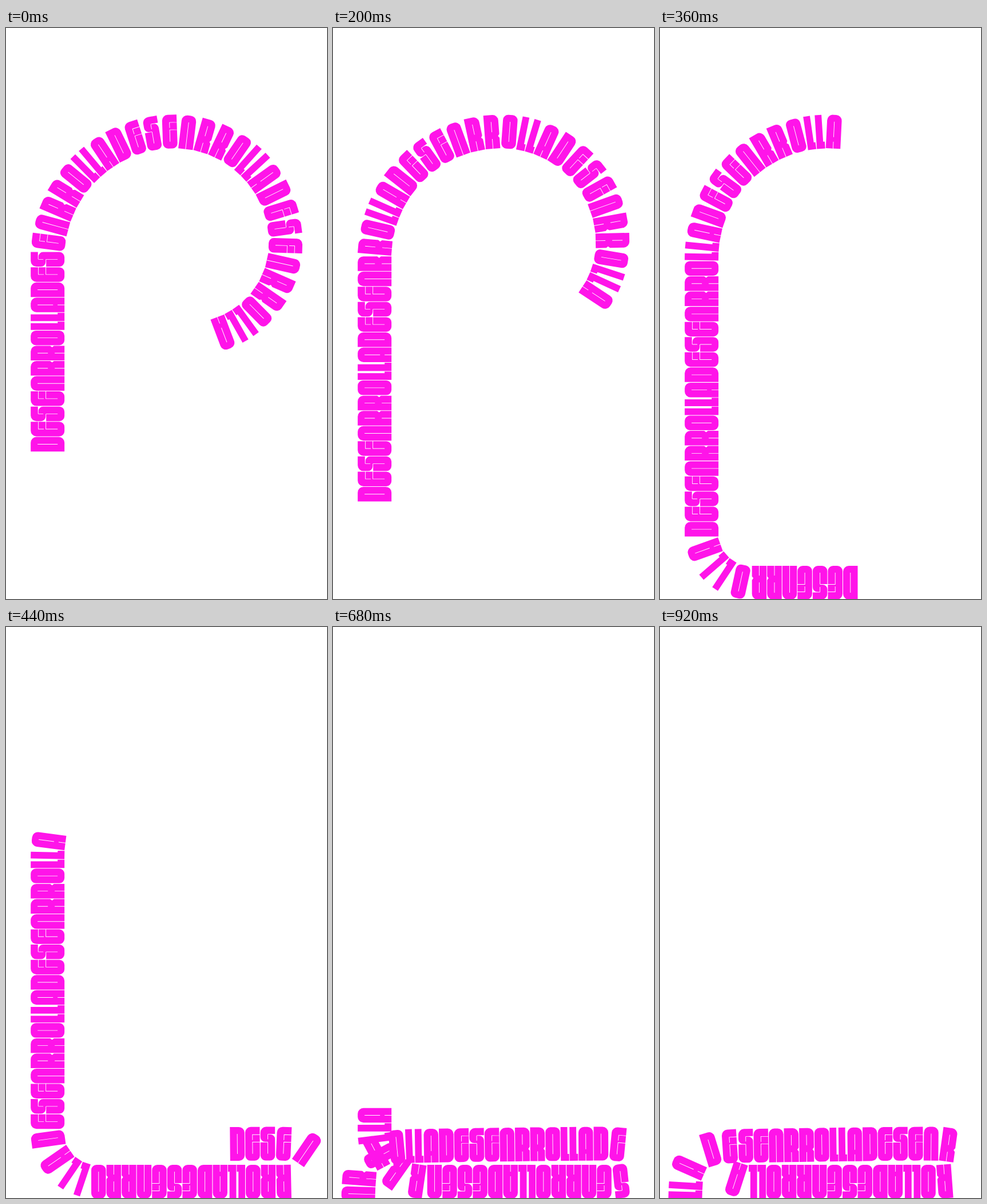
Write an HTML page that moves like this. It is 561 by 998 pixels and loops after 0.96 s.

```html
<!DOCTYPE html>
<html lang="es">
<head>
<meta charset="utf-8">
<title>Desenrrolla</title>
<style>
  html, body { margin: 0; width: 100%; height: 100%; overflow: hidden; background: #fff; }
  svg { display: block; width: 100%; height: 100%; }
</style>
</head>
<body>
<svg id="stage" viewBox="0 0 561 998" role="img" aria-label="DESENRROLLA" fill="#ff14e9" fill-rule="evenodd">
  <path id="track" fill="none" d="M73.6 1320 V1000 C73.8 985 74.7 972 75.5 962
    C76.2 952.7 84.3 944.7 97 941 C105 938.3 125 936.7 150 936.3
    C260 934.5 400 932.8 470 932.5 C490 932.5 506.7 934 510.7 937
    C508 938.5 495 940 480 940 H159 A57 57 0 0 1 102.2 883 V402.5
    A192 192 0 0 1 294.2 210.5 A164.8 164.8 0 0 1 459 375.3 A139 139 0 0 1 320 514.3"/>
</svg>
<script>
const NS = 'http://www.w3.org/2000/svg';
const stage = document.getElementById('stage');
const track = document.getElementById('track');

const LOOP = 960, STEP = 40, TRAVEL = 1282.3, TAIL = 37.1;
const W = 25.5, H = 59, MID = W / 2, GAP = 0.9;

// Box standing on the baseline, one radius per corner
function box(tl, tr, br, bl) {
  const arc = (r, x, y) => `a${r} ${r} 0 0 1 ${x} ${y}`;
  return `M${tl} ${-H}H${W - tr}${arc(tr, tr, tr)}V${-br}${arc(br, -br, br)}` +
         `H${bl}${arc(bl, -bl, -bl)}V${tl - H}${arc(tl, tl, -tl)}z`;
}
const cut = (x, y, w, h) => `M${x} ${y}h${w}v${h}h${-w}z`;
const slit = (top, bottom) => cut(MID - GAP / 2, top, GAP, bottom - top);
const right = y => cut(MID - GAP / 2, y, MID + GAP / 2, GAP);

const glyphs = {
  D: box(0, 10, 10, 0) + slit(-47, -12),
  E: box(10, 0, 9, 9) + right(-46) + right(-33) + slit(-45.1, -36) + slit(-32.1, -12),
  S: `M10 ${-H}H${W}v12.6H${MID}v${GAP}H${W - 8}a8 8 0 0 1 8 8V-9a9 9 0 0 1 -9 9` +
     `H9a9 9 0 0 1 -9 -9V-32H${MID}v${-GAP}H8a8 8 0 0 1 -8 -8V-49a10 10 0 0 1 10 -10z` +
     slit(-45.5, -37) + slit(-32, -12),
  N: box(10, 10, 0, 0) + slit(-47, 0),
  R: `M0 ${-H}H${W - 10}a10 10 0 0 1 10 10V-25l-2.5 3.5l2.5 3V0H0z` + slit(-47, -29) + slit(-17, 0),
  O: box(9, 9, 9, 9) + slit(-47, -12),
  L: `M0 ${-H}H11.8V-12H14.6V0H0z`,
  A: box(10, 10, 0, 0) + slit(-47, -20) + slit(-12, 0)
};
const advance = c => c === 'L' ? 15.53 : 26.55;

let width = 0;
const letters = [...'DESENRROLLA'.repeat(4)].map(c => {
  const el = document.createElementNS(NS, 'path');
  el.setAttribute('d', glyphs[c]);
  stage.append(el);
  const half = advance(c) / 2;
  const letter = { el, half, at: width + half };
  width += 2 * half;
  return letter;
});
const home = track.getTotalLength() - TAIL - width;

// Cubic easing (.55, 0, .29, 1)
function ease(x) {
  let lo = 0, hi = 1;
  for (let i = 0; i < 24; i++) {
    const s = (lo + hi) / 2, q = 1 - s;
    if (3 * q * q * s * 0.55 + 3 * q * s * s * 0.29 + s * s * s < x) lo = s; else hi = s;
  }
  return lo * lo * (3 - 2 * lo);
}

function draw(ms) {
  const start = home - TRAVEL * ease(ms / LOOP);
  for (const { el, half, at } of letters) {
    const s = start + at;
    const p = track.getPointAtLength(s);
    const a = track.getPointAtLength(s - 0.5);
    const b = track.getPointAtLength(s + 0.5);
    const turn = Math.atan2(b.y - a.y, b.x - a.x) * 180 / Math.PI;
    el.setAttribute('transform',
      `translate(${p.x} ${p.y}) rotate(${turn}) translate(${0.5 - half} 0)`);
  }
}

let shown = -1;
const origin = performance.now();
function tick() {
  const t = Math.max(0, performance.now() - origin) % LOOP;
  const ms = Math.floor(t / STEP) * STEP;
  if (ms !== shown) draw(shown = ms);
  requestAnimationFrame(tick);
}
tick();
</script>
</body>
</html>
```
